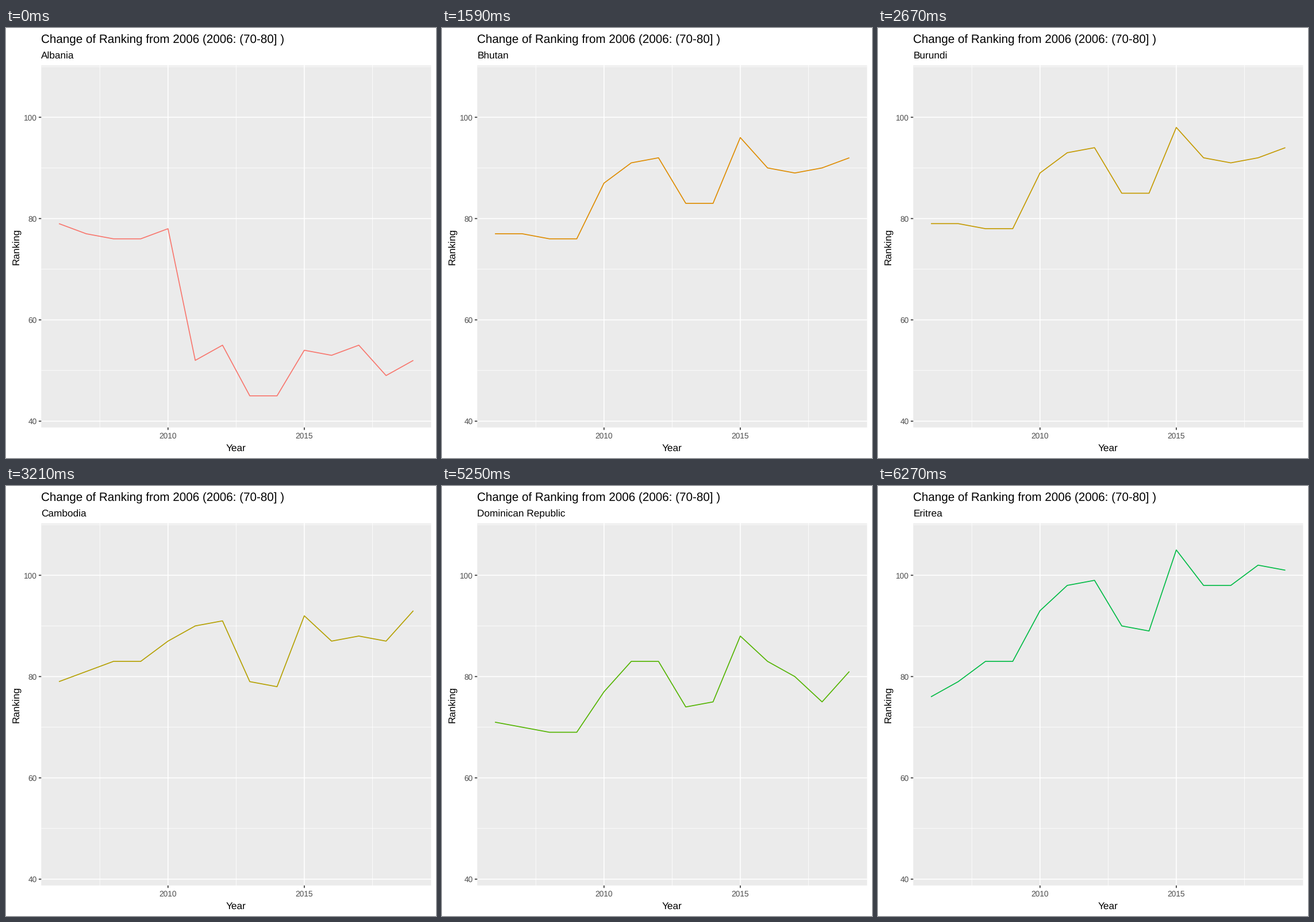
Recreate the animation shown at these times as a matplotlib script. Size 748 px wide and 748 px high, loop 6750 ms.

```python
import math

import numpy as np
import matplotlib.pyplot as plt
from matplotlib.animation import FuncAnimation
from matplotlib.collections import LineCollection
from matplotlib.patches import Rectangle

SIZE, DPI = 748, 100
STEP_MS, LOOP_MS = 30, 6750
HUES = 35  # countries in the whole colour wheel

# Panel edges in pixels, y pointing down
LEFT, RIGHT, TOP, BOTTOM = 61.3, 739.4, 65.0, 694.9
YEARS = np.arange(2006, 2020)

plt.rcParams["font.family"] = ["Liberation Sans"]
plt.rcParams["text.hinting"] = "none"


def px(year):
    return LEFT + (year - 2005.35) / 14.3 * (RIGHT - LEFT)


def py(rank):
    return TOP + (110.25 - rank) / 71.5 * (BOTTOM - TOP)


def pt(pixels):
    return pixels * 72 / DPI


def hcl(hue, chroma=100, lum=65):
    """Polar LUV colour to clipped sRGB."""
    un, vn = 0.1978, 0.4683
    angle = math.radians(hue)
    Y = ((lum + 16) / 116) ** 3
    u = chroma * math.cos(angle) / (13 * lum) + un
    v = chroma * math.sin(angle) / (13 * lum) + vn
    X = 9 * Y * u / (4 * v)
    Z = -X / 3 - 5 * Y + 3 * Y / v
    to_rgb = np.array([[3.2405, -1.5371, -0.4985],
                       [-0.9693, 1.8760, 0.0416],
                       [0.0556, -0.2040, 1.0572]])
    rgb = np.clip(to_rgb @ [X, Y, Z], 0, 1)
    return np.where(rgb > 0.00304, 1.055 * rgb ** (1 / 2.4) - 0.055, 12.92 * rgb)


def typical(start):
    """Ranking history that follows the common course of most countries."""
    course = [0, 0, -1, -1, 10, 14, 15, 6, 6, 19, 13, 12, 13, 15]
    return [start + change for change in course]


# Start time in ms, country, ranking per year
SERIES = [
    (0, "Albania", [79, 77, 76, 76, 78, 52, 55, 45, 45, 54, 53, 55, 49, 52]),
    (510, "Algeria", typical(74)),
    (1050, "Angola", [77, 79, 81, 81, 92, 96, 96, 86, 86, 99, 92, 90, 92, 95]),
    (1590, "Bhutan", typical(77)),
    (2130, "Bosnia and Herzegovina",
     [71, 71, 72, 72, 74, 50, 52, 44, 42, 52, 52, 53, 48, 51]),
    (2670, "Burundi", typical(79)),
    (3210, "Cambodia", [79, 81, 83, 83, 87, 90, 91, 79, 78, 92, 87, 88, 87, 93]),
    (3720, "Cameroon", typical(71)),
    (4230, "China", [78, 78, 79, 79, 88, 90, 92, 82, 83, 94, 87, 85, 71, 74]),
    (4740, "Djibouti", typical(77)),
    (5250, "Dominican Republic",
     [71, 70, 69, 69, 77, 83, 83, 74, 75, 88, 83, 80, 75, 81]),
    (5760, "Equatorial Guinea", typical(78)),
    (6270, "Eritrea", [76, 79, 83, 83, 93, 98, 99, 90, 89, 105, 98, 98, 102, 101]),
]

fig = plt.figure(figsize=(SIZE / DPI, SIZE / DPI), dpi=DPI, facecolor="white")
ax = fig.add_axes([0, 0, 1, 1])
ax.set_xlim(0, SIZE)
ax.set_ylim(SIZE, 0)
ax.axis("off")


def label(x, y, text, size, color="black", **kw):
    return ax.text(x, y, text, fontsize=pt(size), color=color, va="baseline", **kw)


def strokes(segments, color, width, z):
    ax.add_collection(LineCollection(segments, colors=color, linewidths=pt(width),
                                     capstyle="butt", snap=False, zorder=z))


def grid(years, ranks, width, z):
    rows = [[(LEFT, py(r)), (RIGHT, py(r))] for r in ranks]
    columns = [[(px(y), TOP), (px(y), BOTTOM)] for y in years]
    strokes(rows + columns, "white", width, z)


ax.add_patch(Rectangle((LEFT, TOP), RIGHT - LEFT, BOTTOM - TOP,
                       facecolor="#EBEBEB", edgecolor="none", snap=False, zorder=0))
year_ticks, rank_ticks = (2010, 2015), (40, 60, 80, 100)
grid((2007.5, 2012.5, 2017.5), (50, 70, 90, 110), 0.84, 1)
grid(year_ticks, rank_ticks, 1.67, 2)

TICK = 4.3
strokes([[(LEFT - TICK, py(r)), (LEFT, py(r))] for r in rank_ticks]
        + [[(px(y), BOTTOM), (px(y), BOTTOM + TICK)] for y in year_ticks],
        "#333333", 1.67, 3)
for rank in rank_ticks:
    label(53.5, py(rank) + 5.2, str(rank), 13.78, "#4D4D4D", ha="right")
for year in year_ticks:
    label(px(year), 713.8, str(year), 13.78, "#4D4D4D", ha="center")

label(LEFT, 25.2, "Change of Ranking from 2006 (2006: (70-80] )", 20.67)
label((LEFT + RIGHT) / 2, 735.8, "Year", 17.22, ha="center")
label(22.2, (TOP + BOTTOM) / 2, "Ranking", 17.22, ha="center",
      rotation=90, rotation_mode="anchor")

country = label(LEFT, 52.5, "", 17.22)
line, = ax.plot([], [], linewidth=pt(1.67), solid_capstyle="butt",
                solid_joinstyle="round", snap=False, zorder=4)


def update(frame):
    now = frame * STEP_MS
    index = max(i for i, (start, _, _) in enumerate(SERIES) if start <= now)
    _, name, ranks = SERIES[index]
    country.set_text(name)
    line.set_data(px(YEARS), py(np.array(ranks)))
    line.set_color(hcl(15 + 360 * index / HUES))
    return country, line


anim = FuncAnimation(fig, update, frames=LOOP_MS // STEP_MS, interval=STEP_MS,
                     repeat=True, repeat_delay=0)
plt.show()
```
